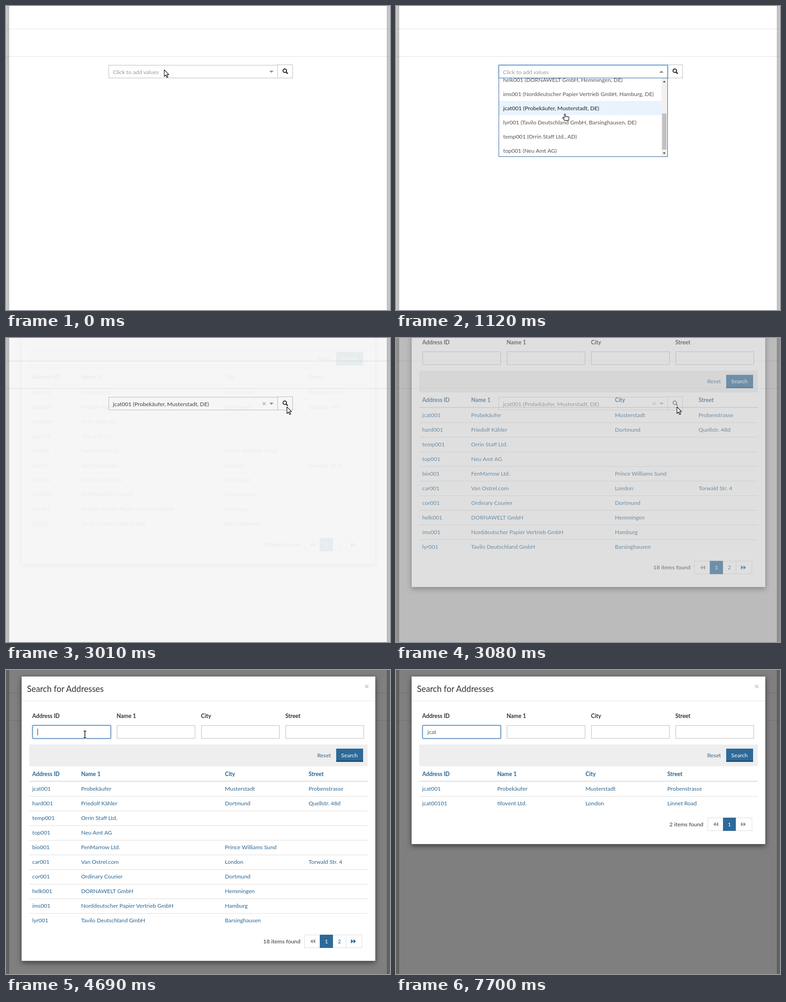
Animation of 842 by 665 pixels, one loop 8000 ms. Source, as an HTML page:

```html
<!DOCTYPE html>
<html lang="en">
<head>
<meta charset="utf-8">
<title>Address search</title>
<style>
  html, body { margin: 0; width: 100%; height: 100%; overflow: hidden; background: #fff; }
  svg { display: block; width: 842px; height: 665px; }
  text { font: 12.32px Lato, sans-serif; white-space: pre; }
  .title { font-size: 18.4px; fill: #333; }
  .b { font-weight: 700; }
  .dark { fill: #333; }
  .mid { fill: #555; }
  .link { fill: #2a6592; }
  .box { fill: #fff; stroke: #bbb; }
  .focus { fill: #fff; stroke: #2d629a; filter: drop-shadow(0 0 2px rgba(70, 150, 220, .75)); }
  .blue { fill: #2d6a98; }
  .line { stroke: #ddd; }
  .cross { stroke: #999; stroke-width: 1.2; fill: none; }
  #cursor path { fill: #fff; stroke: #111; stroke-width: 1.2; stroke-linejoin: round; }
</style>
</head>
<body>
<svg viewBox="0 0 842 665">
  <defs>
    <linearGradient id="side"><stop stop-color="#cacaca"/><stop offset="1" stop-color="#bdbdbd"/></linearGradient>
    <clipPath id="listClip"><rect x="226" y="158" width="357" height="171"/></clipPath>
    <path id="rewind" d="M0,-4.8v9.6l-5.4,-4.8zM5.6,-4.8v9.6l-5.4,-4.8z"/>
  </defs>

  <rect width="842" height="665" fill="#fff"/>
  <rect width="7" height="665" fill="url(#side)"/>
  <rect width="7" height="665" fill="url(#side)" transform="translate(842) scale(-1 1)"/>
  <path d="M0,50.5H842M0,110.5H842" stroke="#000" stroke-opacity=".1"/>

  <rect class="box" x="595.5" y="128.5" width="33" height="29"/>
  <rect x="596" y="129" width="32" height="28" fill="#e6e6e6" data-on="2660 2870"/>
  <g fill="none" stroke="#222"><circle cx="611.3" cy="141.6" r="3.9" stroke-width="2"/><path d="M614.3,144.6l3.6,3.6" stroke-width="2.6"/></g>
  <rect class="box" x="225.5" y="129.5" width="370" height="28"/>
  <rect class="focus" x="225.5" y="129.5" width="370" height="28" data-on="70 2870"/>
  <text x="234.5" y="148.8" fill="#999" data-on="0 1400">Click to add values</text>
  <g data-on="1610 8000">
    <text class="dark" x="234.5" y="148.8">jcat001 (Probekäufer, Musterstadt, DE)</text>
    <path class="cross" d="M562.8,140.3l6.6,6.6m0,-6.6l-6.6,6.6"/>
  </g>
  <path id="chevron" d="M-4.7,-2.3h9.4l-4.7,4.6z" fill="#888"/>

  <g data-on="70 1610">
    <rect x="225.5" y="157.5" width="370" height="172" fill="#fff" stroke="#2d629a"/>
    <g clip-path="url(#listClip)"><g id="list"></g></g>
    <rect x="582" y="158" width="13" height="171" fill="#f1f1f1"/>
    <rect id="thumb" x="583.5" width="9.5" height="79" fill="#c1c1c1"/>
    <path d="M585,167l3.2,-3.6l3.2,3.6zM585,320.4l3.2,3.6l3.2,-3.6z" fill="#444"/>
  </g>

  <rect id="shade" width="842" height="665"/>

  <g id="modal">
    <rect id="panel" x="34" y="14" width="776" fill="#fff" stroke="#000" stroke-opacity=".25" style="filter:drop-shadow(0 4px 6px rgba(0,0,0,.5))"/>
    <text class="title" x="46" y="48">Search for Addresses</text>
    <path class="cross" d="M787.5,32.5l7,7m0,-7l-7,7" style="stroke:#ccc;stroke-width:2"/>
    <path d="M34,67.5H810" stroke="#e5e5e5"/>
    <g id="fields"></g>
    <rect class="focus" x="58.5" y="121.5" width="171" height="28" data-on="3360 8000"/>
    <text id="typed" class="mid" x="69" y="140.4"></text>
    <rect id="caret" y="128" width="1" height="15" fill="#222" data-on="3360 3920,4480 5250,5810 7560"/>
    <rect x="51" y="163" width="742" height="47.5" fill="#eee"/>
    <text class="link" x="682.5" y="190.9">Reset</text>
    <rect class="blue" x="724" y="172" width="59" height="29"/>
    <rect x="724" y="198" width="59" height="3" fill="#1f4e74"/>
    <text x="735" y="190.9" fill="#fff">Search</text>
    <g id="all" data-on="0 6930"></g>
    <g id="found" data-on="6930 8000"></g>
  </g>

  <g id="cursor">
    <path id="arrow" d="M0,.6V15.2L3.5,12L5.9,17.4L8.2,16.4L5.8,11.1H10.2Z"/>
    <path id="hand" d="M0,1.6a1.3,1.3 0 0 1 2.6,0V6.2h6q1.6,.2 1.6,2V11l-1.2,3.4H1L-3,9.6q-1,-1.6 .6,-1.9L0,9z"/>
    <g id="beam">
      <path d="M-3,-7.5h6M0,-7.5v15M-3,7.5h6" style="stroke:#fff;stroke-width:3"/>
      <path d="M-3,-7.5h6M0,-7.5v15M-3,7.5h6" style="stroke-width:1.5"/>
    </g>
  </g>
</svg>

<script>
const LOOP = 8000, STEP = 70, ROW = 31.1;
const $ = id => document.getElementById(id);
const heads = ['Address ID', 'Name 1', 'City', 'Street'];
const fieldX = heads.map((_, i) => 58.5 + i * 185);

const options = [
  'bio001 (FenMarrow Ltd., Prince Williams Sund)',
  'car001 (Van Ostrel.com, London, GB)',
  'cor001 (Ordinary Courier, Dortmund, DE)',
  'hard001 (Friedolf Kähler, Dortmund, DE)',
  'helk001 (DORNAWELT GmbH, Hemmingen, DE)',
  'ims001 (Norddeutscher Papier Vertrieb GmbH, Hamburg, DE)',
  'jcat001 (Probekäufer, Musterstadt, DE)',
  'lyr001 (Tavilo Deutschland GmbH, Barsinghausen, DE)',
  'temp001 (Orrin Staff Ltd., AD)',
  'top001 (Neu Amt AG)'
];

const allRows = [
  'jcat001|Probekäufer|Musterstadt|Probenstrasse',
  'hard001|Friedolf Kähler|Dortmund|Quellstr. 48d',
  'temp001|Orrin Staff Ltd.',
  'top001|Neu Amt AG',
  'bio001|FenMarrow Ltd.|Prince Williams Sund',
  'car001|Van Ostrel.com|London|Torwald Str. 4',
  'cor001|Ordinary Courier|Dortmund',
  'helk001|DORNAWELT GmbH|Hemmingen',
  'ims001|Norddeutscher Papier Vertrieb GmbH|Hamburg',
  'lyr001|Tavilo Deutschland GmbH|Barsinghausen'
];
const foundRows = [
  'jcat001|Probekäufer|Musterstadt|Probenstrasse',
  'jcat00101|tilovent Ltd.|London|Linnet Road'
];

const label = (x, mid, str, cls) => `<text class="${cls}" x="${x}" y="${mid + 4.4}">${str}</text>`;
const rule = (y, w = 1) => `<path class="line" d="M51,${y}H793" stroke-width="${w}"/>`;

function table(rows, xs) {
  const cells = (list, mid, cls) => list.map((s, i) => label(xs[i], mid, s, cls)).join('');
  return cells(heads, 227.5, 'link b') + rule(243.5, 2) + rows.map((r, i) =>
    (i ? rule(244.5 + i * 32) : '') + cells(r.split('|'), 260 + i * 31.96, 'link')).join('');
}

function pager(mid, text, textX, pages, next) {
  const left = 711.5 - 28.5 * pages.length;
  let out = label(textX, mid, text, 'dark') +
    `<rect x="${Math.floor(left) + .5}" y="${mid - 14}" width="${780 - Math.floor(left)}" height="28" fill="#fff" stroke="#ddd"/>`;
  pages.forEach((n, i) => {
    const x = left + 34 + i * 28.5;
    out += i ? '' : `<rect class="blue" x="${Math.floor(x)}" y="${mid - 14.5}" width="29" height="29"/>`;
    out += `<text x="${x + 14.2}" y="${mid + 4.4}" text-anchor="middle" fill="${i ? '#2a6592' : '#fff'}">${n}</text>`;
  });
  return out + `<path class="line" d="M745.5,${mid - 14}v28"/>` +
    `<use href="#rewind" x="${left + 18}" y="${mid}" fill="#999"/>` +
    `<use href="#rewind" transform="translate(762 ${mid}) scale(-1 1)" fill="${next}"/>`;
}

$('list').innerHTML = options.map((s, i) =>
  `<g><rect x="226" y="${158 + i * ROW}" width="357" height="${ROW}"/>` +
  `<text x="235" y="${178.4 + i * ROW}">${s}</text></g>`).join('');
$('fields').innerHTML = heads.map((s, i) => label(fieldX[i] - 1, 100.6, s, 'dark b') +
  `<rect class="box" x="${fieldX[i]}" y="121.5" width="171" height="28"/>`).join('');
$('all').innerHTML = table(allRows, [57.5, 164.7, 480, 663.5]) +
  pager(593.5, '18 items found', 564, [1, 2], '#2d6a98');
$('found').innerHTML = table(foundRows, [57.5, 222, 415.5, 595]) +
  pager(337.5, '2 items found', 599.5, [1], '#999');

const timed = [...document.querySelectorAll('[data-on]')].map(el =>
  [el, el.dataset.on.split(',').map(s => s.split(' ').map(Number))]);
const rows = [...$('list').children];

// time, x, y of the pointer's hot spot
const path = [
  [0, 347, 139], [350, 347, 139], [840, 369, 236], [1190, 369, 236], [1400, 375, 235],
  [1540, 375, 235], [2100, 503, 166], [2310, 532, 109], [2380, 537, 111], [2730, 616, 150],
  [3290, 616, 150], [3780, 222, 372], [4060, 227, 372], [4690, 173, 141], [4830, 173, 141],
  [4900, 166, 141], [7560, 166, 141], [7630, 317, 104], [LOOP, 317, 104]
];

const part = (t, from, span) => Math.min(1, Math.max(0, (t - from) / span));
const smooth = k => k * k * (3 - 2 * k);
const within = (t, spans) => spans.some(([a, b]) => t >= a && t < b);
const show = (el, on) => { el.style.display = on ? '' : 'none'; };

function pointer(t) {
  const i = path.findIndex(p => p[0] > t);
  const [a, b] = [path[i - 1], path[i]];
  const k = smooth(part(t, a[0], b[0] - a[0]));
  return [a[1] + (b[1] - a[1]) * k, a[2] + (b[2] - a[2]) * k];
}

function render(t) {
  timed.forEach(([el, spans]) => show(el, within(t, spans)));
  const [x, y] = pointer(t);

  const open = t >= 70 && t < 1610;
  $('chevron').setAttribute('transform', `translate(582 143.7) scale(1 ${open ? -1 : 1})`);
  const scroll = 137 * smooth(part(t, 770, 350));
  const hot = y > 158 ? Math.floor((y - 158 + scroll) / ROW) : 0;
  $('list').setAttribute('transform', `translate(0 ${-scroll})`);
  $('thumb').setAttribute('y', 171 + scroll * .467);
  rows.forEach((g, i) => {
    g.firstChild.setAttribute('fill', i === hot ? '#e8f3fd' : '#fff');
    g.lastChild.setAttribute('fill', i === hot ? '#222' : '#555');
  });

  const fade = part(t, 3000, 150);
  const slide = Math.sin(part(t, 3000, 317) * Math.PI / 2);
  $('shade').setAttribute('opacity', fade / 2);
  $('modal').setAttribute('opacity', fade);
  $('modal').setAttribute('transform', `translate(0 ${-149 * (1 - slide)})`);
  $('panel').setAttribute('height', t < 6930 ? 622.5 : 367);

  const typed = [5950, 6090, 6230, 6440].filter(k => t >= k).length;
  $('typed').textContent = 'jcat'.slice(0, typed);
  $('caret').setAttribute('x', [69, 72, 78, 84, 88][typed]);

  const hand = open && y > 158;
  const beam = t > 3360 && y > 120 && y < 150 && fieldX.some(f => x > f && x < f + 171);
  show($('hand'), hand);
  show($('beam'), beam);
  show($('arrow'), !hand && !beam);
  show($('cursor'), within(t, [[0, 4970], [7560, 7700]]));
  $('cursor').setAttribute('transform', `translate(${Math.round(x)} ${Math.round(y)})`);
}

let start;
function tick(now) {
  start ??= now;
  const t = (now - start) % LOOP;
  render(Math.floor((t + 1) / STEP) * STEP % LOOP);
  requestAnimationFrame(tick);
}
render(0);
requestAnimationFrame(tick);
</script>
</body>
</html>
```
